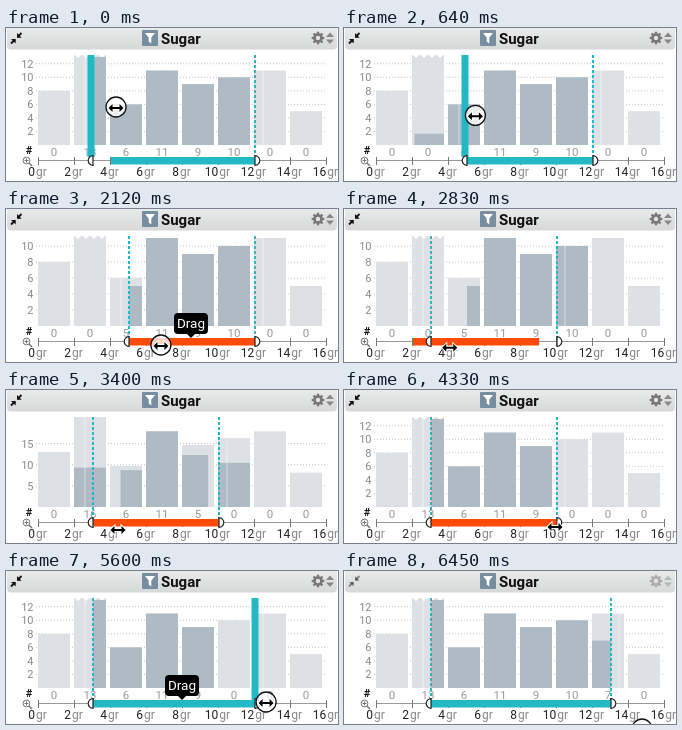
An HTML page with a canvas for the animation above (6.55 s loop, 332 by 153 pixels).

```html
<!DOCTYPE html>
<html lang="en">
<head>
<meta charset="utf-8">
<title>Sugar range filter</title>
<style>
html, body { margin: 0; width: 332px; height: 153px; overflow: hidden; background: #fff; }
canvas { display: block; }
</style>
</head>
<body>
<canvas id="stage" width="332" height="153"></canvas>
<script>
const c = document.getElementById('stage').getContext('2d');
const LOOP = 6550, BASE = 117, TOP = 27, PLOT = 88, AXIS = 132, GRAM = 18;
const TEAL = '#22b9c5', RED = '#ff4a08', LIGHT = '#dde1e6', DARK = '#afbbc4';
const FONT = 'Roboto, Arial, sans-serif';
const totals = [8, 16, 6, 11, 9, 10, 11, 5];

// Applied filters: time, range in grams, top of the scale
const filters = [
  { at: -999, lo: 3, hi: 12, max: 13 },
  { at: 300, lo: 4, hi: 12, max: 13 },
  { at: 940, lo: 5, hi: 12, max: 11 },
  { at: 3160, lo: 2, hi: 9, max: 16 },
  { at: 3700, lo: 3, hi: 10, max: 13 },
  { at: 5850, lo: 3, hi: 13, max: 13 }
];

// Pointer path: time, x, y
const path = [
  [-100, 98, 79], [0, 110, 79], [690, 133, 88], [1300, 133, 88], [1950, 155, 136], [2120, 155, 136],
  [2900, 101, 138], [3050, 101, 138], [3300, 112, 139], [3500, 112, 139], [4200, 211, 136],
  [4400, 211, 136], [5000, 224, 134], [5600, 260, 131], [5800, 278, 131], [6400, 298, 158]
];

const lerp = (a, b, p) => a + (b - a) * p;
const clamp = (v, a, b) => Math.min(b, Math.max(a, v));
const ease = p => p < .5 ? 4 * p ** 3 : 1 - 4 * (1 - p) ** 3;
const gramX = g => 33 + g * GRAM;

function pointer(t) {
  const i = clamp(path.findLastIndex(k => k[0] <= t), 0, path.length - 2);
  const [t0, x0, y0] = path[i], [t1, x1, y1] = path[i + 1];
  const p = clamp((t - t0) / (t1 - t0), 0, 1);
  return [lerp(x0, x1, p), lerp(y0, y1, p)];
}

// Three drags: left handle, whole band, right handle; each snaps to whole grams
function range(t) {
  const steps = (from, to, x) => Math.round((pointer(clamp(t, from, to))[0] - x) / GRAM);
  const shift = steps(2120, 3500, 155);
  return [steps(-100, 700, 41) + shift, 12 + shift + steps(5000, 5850, 224)];
}

// Points crowd towards the right of the low bar and the left of the high bar
function selected(f, i) {
  const a = i * 2, b = a + 2;
  if (b <= f.lo || a >= f.hi) return 0;
  return Math.round(totals[i] * (f.lo > a ? .82 : f.hi < b ? .6 : 1));
}

function rect(x, y, w, h, fill) {
  c.fillStyle = fill;
  c.fillRect(x, y, w, h);
}

function line(points, color, width = 1, dash = []) {
  c.beginPath();
  points.forEach(([x, y]) => c.lineTo(x, y));
  c.strokeStyle = color;
  c.lineWidth = width;
  c.setLineDash(dash);
  c.stroke();
  c.setLineDash([]);
}

function poly(points, fill) {
  c.beginPath();
  points.forEach(([x, y]) => c.lineTo(x, y));
  c.fillStyle = fill;
  c.fill();
}

function circle(x, y, r, stroke, width, fill = 'transparent') {
  c.beginPath();
  c.arc(x, y, r, 0, 7);
  c.fillStyle = fill;
  c.fill();
  c.strokeStyle = stroke;
  c.lineWidth = width;
  c.stroke();
}

function text(s, x, y, size, fill, align = 'center', weight = 400) {
  c.font = `${weight} ${size}px ${FONT}`;
  c.textAlign = align;
  c.fillStyle = fill;
  c.fillText(s, x, y);
}

function box(x, y, w, h, r, fill) {
  c.beginPath();
  c.roundRect(x, y, w, h, r);
  c.fillStyle = fill;
  c.fill();
}

function header(active) {
  const g = c.createLinearGradient(0, 0, 0, 22);
  g.addColorStop(0, '#e9eaea');
  g.addColorStop(1, '#d6d7d7');
  box(1, 0, 330, 21.5, [0, 0, 4, 4], g);
  box(136, 2, 16, 16, 1, '#778da0');
  poly([[139, 5], [149, 5], [145.3, 9.5], [145.3, 15.5], [142.7, 13.5], [142.7, 9.5]], '#fff');
  text('Sugar', 155, 15.5, 15, '#111', 'left', 700);

  c.globalAlpha = active ? 1 : .45;
  line([[5, 15.5], [9, 11.5]], '#111', 1.8);
  line([[11.5, 9], [15.5, 5]], '#111', 1.8);
  poly([[5, 11], [9.7, 11], [9.7, 15.5]], '#111');
  poly([[11, 5], [11, 9.7], [15.7, 9.7]], '#111');
  circle(312, 10, 3.5, '#777', 2.6);
  for (let i = 0; i < 8; i++) {
    const a = i * Math.PI / 4, x = Math.cos(a), y = Math.sin(a);
    line([[312 + x * 4, 10 + y * 4], [312 + x * 6.3, 10 + y * 6.3]], '#777', 2.3);
  }
  poly([[320, 9], [328, 9], [324, 4.5]], '#888');
  poly([[320, 11.5], [328, 11.5], [324, 16]], '#888');
  c.globalAlpha = 1;
}

// Each tick slides from where the tick of the same rank stood
function ticks(f, prev, p) {
  const step = q => q.max > 15 ? 5 : 2;
  for (let i = 1; i * step(f) <= f.max; i++) {
    const height = q => i * step(q) * PLOT / q.max;
    const y = BASE - lerp(height(prev), height(f), p);
    line([[30, y], [319, y]], '#c4c4c4', 1, [1, 2]);
    text(i * step(f), 27.5, y + 4, 11, '#8a8a8a', 'right');
  }
}

function bars(f, prev, p) {
  const scale = lerp(PLOT / prev.max, PLOT / f.max, p);
  totals.forEach((total, i) => {
    const x = 32 + i * 36, g = i * 2;
    const h = Math.min(total * scale, 90);
    rect(x, BASE - h, 32, h, LIGHT);
    for (let a = x; total > f.max && a < x + 32; a += 8) {
      poly([[a, TOP - 1], [a + 8, TOP - 1], [a + 4, TOP + 3]], '#fff');
    }
    const mix = fn => lerp(fn(prev), fn(f), p);
    const a = mix(q => q.lo > g && q.lo < g + 2 ? gramX(q.lo) : x);
    const b = mix(q => q.hi > g && q.hi < g + 2 ? gramX(q.hi) : x + 32);
    const sel = mix(q => selected(q, i) * PLOT / q.max);
    rect(a, BASE - sel, b - a, sel, DARK);
    text(selected(f, i), x + 16, 128, 11.5, '#999');
  });
}

function axis() {
  text('#', 23, 126, 11, '#111', 'center', 700);
  circle(20.5, 132.5, 3.4, '#777', 1);
  line([[23, 135], [26, 138]], '#777', 1.5);
  line([[18.5, 132.5], [22.5, 132.5]], '#777');
  line([[20.5, 130.5], [20.5, 134.5]], '#777');
  line([[32, AXIS + .5], [320, AXIS + .5]], '#999');
  for (let g = 0; g <= 16; g += 2) {
    const x = 32 + g * GRAM;
    line([[x + .5, 129], [x + .5, 137]], '#777');
    c.font = `12px ${FONT}`;
    const num = c.measureText(g).width, unit = c.measureText('gr').width + 1;
    const start = x - .5 - (num + unit) / 2;
    text(g, start, 148, 12, '#222', 'left');
    text('gr', start + num + 1, 148, 12, '#888', 'left');
  }
}

function handle(x, thick, side) {
  rect(x + side * 8 - .5, TOP, 1, BASE - TOP, 'rgba(255,255,255,.5)');
  if (thick) rect(x - 4.5 + side, TOP, 7, 102, TEAL);
  else line([[x, TOP], [x, 129]], TEAL, 2, [3, 2]);
}

function grip(x, side) {
  c.beginPath();
  c.arc(x, AXIS + .5, 4.8, -Math.PI / 2, Math.PI / 2, side < 0);
  c.closePath();
  c.fillStyle = '#fff';
  c.fill();
  c.strokeStyle = '#222';
  c.lineWidth = 1.2;
  c.stroke();
}

function tooltip(x) {
  box(x - 17, 104, 34, 21, 4, '#000');
  poly([[x - 4, 125], [x + 4, 125], [x, 129]], '#000');
  text('Drag', x, 119, 13.5, '#fff');
}

function arrows(x, y) {
  const tip = side => [[3.5, -1], [3.5, -4], [7.5, 0], [3.5, 4], [3.5, 1]].map(([a, b]) => [x + side * a, y + side * b]);
  const shape = [...tip(1), ...tip(-1)];
  line([...shape, shape[0]], '#fff', 2);
  poly(shape, '#000');
}

function hand(x, y) {
  c.save();
  c.translate(x - 7, y - 8);
  const shape = new Path2D('M2 1.5Q3.5-.5 5 1.5L6.3 6Q8 4.8 9 6.3Q10.5 5.3 11.5 7Q13.3 6.7 13.6 8.5L14 12L12.5 17H6L1.2 11.8Q-.5 9.2 1.5 9L4 10.5Z');
  c.fillStyle = '#fff';
  c.fill(shape);
  c.strokeStyle = '#111';
  c.lineWidth = 1.2;
  c.stroke(shape);
  for (let a = 7; a < 12; a += 2.1) line([[a, 9.5], [a + .5, 13.5]], '#111', .8);
  c.restore();
}

function cursor(t) {
  const [x, y] = pointer(t);
  if (t >= 700 && t < 1800) return hand(x, y);
  if (t < 700 || (t > 1950 && t < 2300) || t > 5000) circle(x, y, 10, '#111', 1.3, 'rgba(255,255,255,.75)');
  arrows(x, y + 1);
}

function draw(t) {
  const i = filters.findLastIndex(f => t >= f.at);
  const f = filters[i], prev = filters[Math.max(0, i - 1)];
  const p = ease(Math.min(1, (t - f.at) / 500));
  const [start, end] = range(t).map(gramX);
  const [lo, hi] = range(t - 100).map(gramX); // handles trail the band

  rect(0, 0, 332, 153, '#fff');
  header(t < 6390);
  ticks(f, prev, p);
  bars(f, prev, p);
  axis();
  rect(start, 129, end - start, 7.5, t > 1900 && t < 4500 ? RED : TEAL);
  handle(lo, t < 1500, -1);
  handle(hi, t > 4650 && t < 5850, 1);
  grip(lo, -1);
  grip(hi, 1);
  if (t > 1960 && t < 2250) tooltip(185);
  if (t > 5030 && t < 5710) tooltip(176);
  cursor(t);
}

function frame() {
  draw(performance.now() % LOOP);
  requestAnimationFrame(frame);
}
frame();
</script>
</body>
</html>
```
